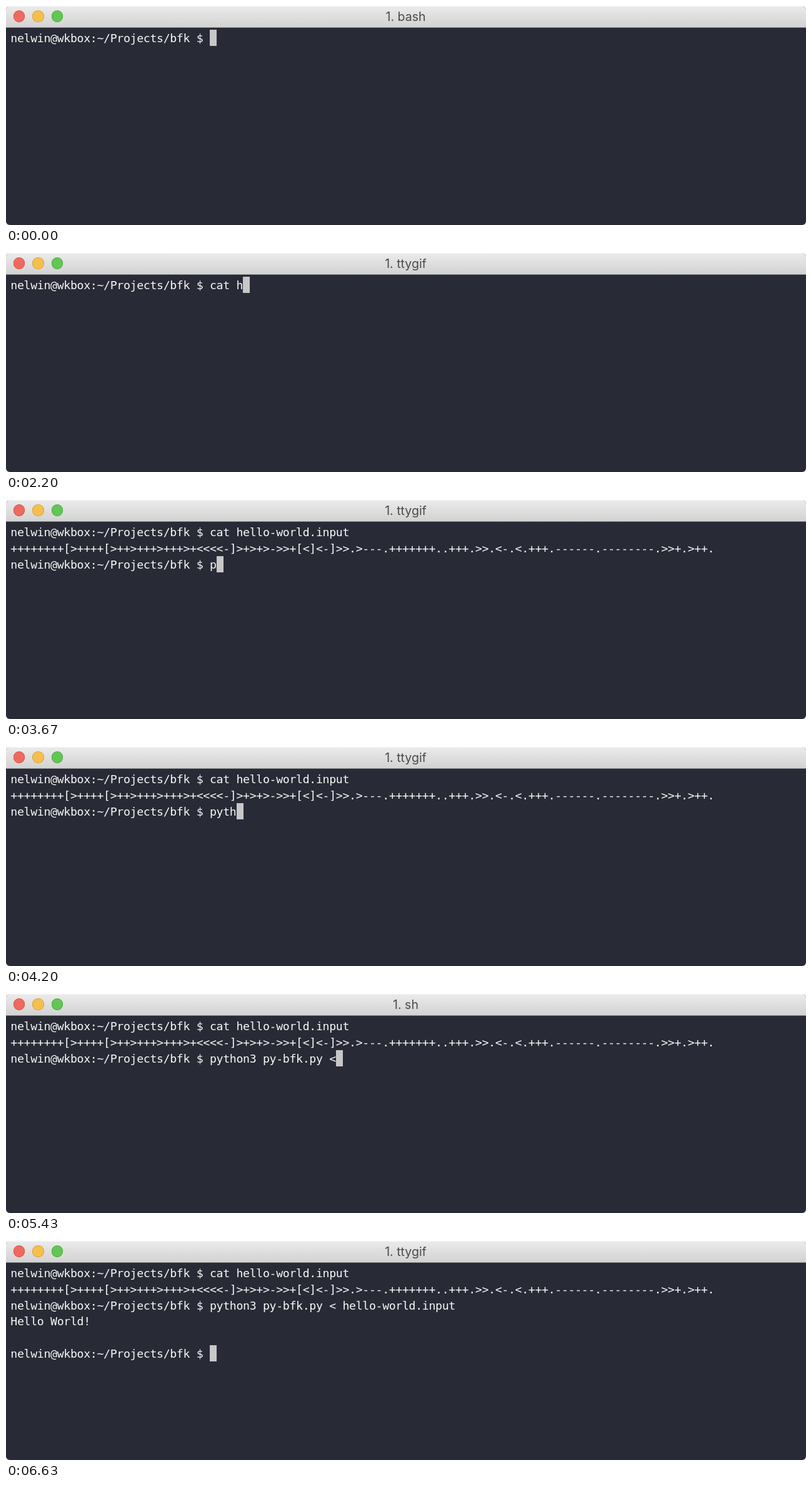
Recreate the animation shown at these times as an HTML page. Size 1280 by 351 pixels, loop 8.03 s.

```html
<!DOCTYPE html>
<html lang="en">
<head>
<meta charset="utf-8">
<title>Terminal</title>
<style>
  html, body { margin: 0; width: 100%; height: 100%; overflow: hidden; background: #fff; }
  .window {
    position: relative; width: 1280px; height: 351px; overflow: hidden;
    background: #282a36; border-radius: 6px;
  }
  .bar {
    position: absolute; left: 0; top: 0; width: 1280px; height: 35px; box-sizing: border-box;
    background: linear-gradient(#ebebeb, #d2d2d2); border-bottom: 1px solid #88898c;
    box-shadow: inset 0 1px #f5f5f5;
  }
  .bar i {
    position: absolute; top: 7.4px; width: 18.2px; height: 18.2px; border-radius: 50%;
    background: var(--fill); box-shadow: inset 0 0 0 1px var(--edge);
  }
  .close { left: 12.1px; --fill: #ee6a5f; --edge: #d65549; }
  .mini { left: 42.4px; --fill: #f5bf4f; --edge: #dba33c; }
  .zoom { left: 72.7px; --fill: #62c655; --edge: #51ac43; }
  #title {
    position: absolute; left: 0; width: 1279px; top: 0; text-align: center;
    font: 19.5px/34px Inter, Roboto, sans-serif; color: #4b4a4b; white-space: pre;
  }
  #screen {
    position: absolute; left: 7.35px; top: 39px; margin: 0; color: #f8f8f5;
    font: 18.22px/25.8px "DejaVu Sans Mono", "Noto Sans Mono", monospace;
    letter-spacing: -0.338px; font-variant-ligatures: none; white-space: pre;
  }
  #cursor { position: absolute; width: 11px; height: 26px; background: #c7c7c7; }
</style>
</head>
<body>
<div class="window">
  <div class="bar">
    <i class="close"></i><i class="mini"></i><i class="zoom"></i>
    <div id="title"></div>
  </div>
  <pre id="screen"></pre>
  <div id="cursor"></div>
</div>
<script>
const LOOP = 8030, LEFT = 7.35, TOP = 38, CELL = 10.63, ROW = 25.8;
const prompt = "nelwin@wkbox:~/Projects/bfk $ ";
const program = "++++++++[>++++[>++>+++>+++>+<<<<-]>+>+>->>+[<]<-]>>.>---.+++++++..+++.>>.<-.<.+++.------.--------.>>+.>++.";
const cat = prompt + "cat hello-world.input";
const second = cat + "\n" + program + "\n" + prompt;
const run = second + "python3 py-bfk.py < hello-world.input";

const typed = (base, keys) => keys.map(([time, text]) => [time, base + text]);

const screens = [
  ...typed(prompt, [
    [0, ""], [1640, "c"], [1750, "ca"], [1910, "cat"], [2040, "cat "],
    [2200, "cat h"], [2280, "cat he"], [2360, "cat hello-world.input "]
  ]),
  [2610, cat + "\n"],
  ...typed(second, [
    [2710, ""], [3670, "p"], [3980, "py"], [4070, "pyt"], [4160, "pyth"], [4260, "pytho"],
    [4420, "python"], [4540, "python3"], [4750, "python3 "],
    [4980, "python3 p"], [5060, "python3 py-bfk.py "],
    [5430, "python3 py-bfk.py <"], [5710, "python3 py-bfk.py < "],
    [5990, "python3 py-bfk.py < h"], [6060, "python3 py-bfk.py < he"]
  ]),
  [6130, run + " "],
  [6490, run + "\n"],
  [6560, run + "\nHello World!\n"],
  [6630, run + "\nHello World!\n\n" + prompt]
];
const titles = [[0, "1. bash"], [2200, "1. ttygif"], [5060, "1. sh"], [6060, "1. ttygif"]];

const [title, screen, cursor] = ["title", "screen", "cursor"].map(id => document.getElementById(id));
const at = (cues, time) => cues.findLast(cue => cue[0] <= time)[1];
let shown = null;

function draw() {
  const time = performance.now() % LOOP;
  const text = at(screens, time), name = at(titles, time);
  if (title.textContent !== name) title.textContent = name;
  if (text !== shown) {
    shown = text;
    screen.textContent = text;
    const lines = text.split("\n");
    cursor.style.left = Math.round(LEFT + lines.at(-1).length * CELL) + "px";
    cursor.style.top = Math.round(TOP + (lines.length - 1) * ROW) + "px";
  }
  requestAnimationFrame(draw);
}
draw();
</script>
</body>
</html>
```
